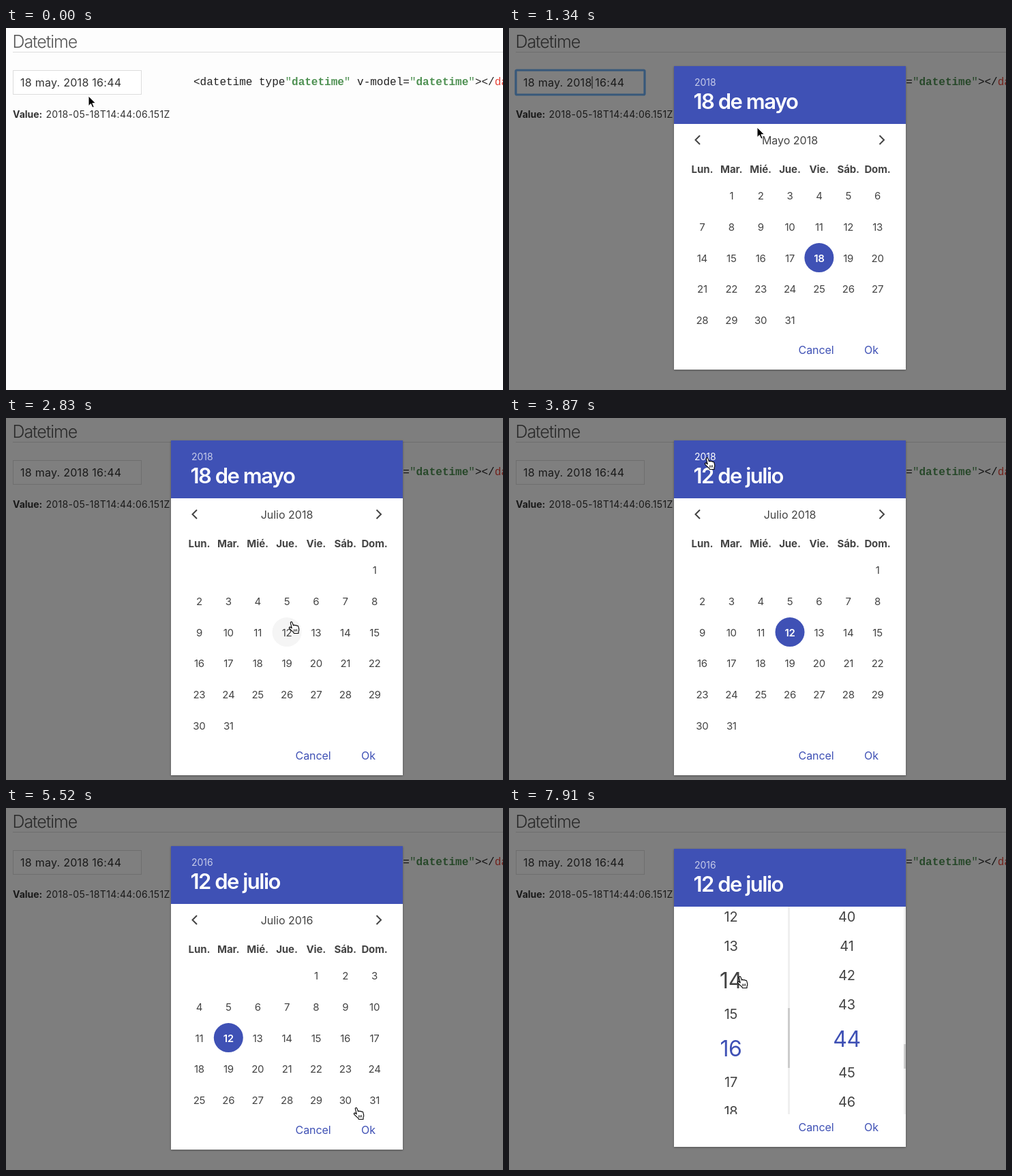
These frames come from a looping animation (729x532 px, 8000 ms). An HTML page:

```html
<!DOCTYPE html>
<html lang="es">
<head>
<meta charset="utf-8">
<title>Datetime</title>
<style>
  html, body { margin: 0; width: 100%; height: 100%; overflow: hidden; background: #fdfdfd; }
  #stage { display: block; font-family: Inter, Roboto, sans-serif; }
  .code { font: 16px "Liberation Mono", monospace; white-space: pre; }
  .popup { filter: drop-shadow(0 1px 1.5px rgba(0, 0, 0, .35)); }
</style>
</head>
<body>
<svg id="stage" width="729" height="532" viewBox="0 0 729 532"></svg>
<script>
const LOOP = 8000, STEP = 149.25;
const BLUE = '#3f51b5', INK = '#444';
const LEFT = 242, WIDTH = 340, MIDDLE = 279;
const MONTHS = { 4: 'Mayo', 5: 'Junio', 6: 'Julio' };
const WEEKDAYS = ['Lun.', 'Mar.', 'Mié.', 'Jue.', 'Vie.', 'Sáb.', 'Dom.'];
const stage = document.getElementById('stage');

// Moments of the story, counted in steps
const FOCUS = 6, TO_JUNE = 12, TO_JULY = 14, PICK_DAY = 21, OPEN_YEARS = 28, PICK_YEAR = 34, OPEN_TIME = 49;

// Pointer path: step, x, y
const PATH = [
  [0, 121, 100], [1, 121, 100], [2, 120, 100], [3, 120, 100], [4, 121, 96], [6, 121, 82], [7, 121, 82],
  [8, 215, 108], [9, 364, 146], [10, 480, 163], [11, 541, 161], [15, 540, 160], [16, 532, 172],
  [18, 440, 272], [19, 415, 299], [21, 415, 299], [22, 411, 285], [24, 350, 150], [26, 287, 58],
  [28, 285, 56], [29, 300, 85], [31, 404, 282], [33, 380, 228], [34, 376, 223], [35, 395, 255],
  [37, 510, 440], [38, 528, 466], [41, 528, 466], [43, 541, 481], [44, 537, 476], [45, 533, 477],
  [46, 533, 477], [47, 530, 476], [49, 527, 470], [51, 420, 330], [53, 335, 247], [54, 335, 247]
];

const rect = (x, y, w, h, fill, extra = '') =>
  `<rect x="${x}" y="${y}" width="${w}" height="${h}" fill="${fill}" ${extra}/>`;

function text(str, x, y, size, { fill = INK, weight = 400, anchor = 'start', gap = 0, extra = '' } = {}) {
  return `<text x="${x}" y="${y}" font-size="${size}" font-weight="${weight}" fill="${fill}"
    text-anchor="${anchor}" letter-spacing="${gap}" ${extra}>${str}</text>`;
}

const centered = (str, x, y, size, options) => text(str, x, y, size, { anchor: 'middle', ...options });

function page(step) {
  const focused = step >= FOCUS && step < TO_JUNE;
  const string = '"<tspan font-weight="700">datetime</tspan>"';
  const green = `<tspan fill="#4f9153">${string}</tspan>`;
  const ring = focused
    ? '<rect x="10" y="62" width="189" height="36" rx="1.5" fill="none" stroke="#6fb1f5" stroke-width="3.2"/>' +
      rect(121.5, 71, 1, 18, '#222')
    : '';
  return rect(0, 0, 729, 532, '#fdfdfd') +
    text('Datetime', 9.5, 29, 25, { weight: 300, fill: '#555', gap: -1.05 }) +
    rect(10, 35, 719, 1, '#ddd') +
    rect(10.5, 62.5, 188, 35, '#fff', 'stroke="#ddd"') +
    text('18 may. 2018 16:44', 21, 86, 16, { fill: '#333', gap: .27 }) + ring +
    text('Value:', 10, 132, 14, { fill: '#333', weight: 700 }) +
    text('2018-05-18T14:44:06.151Z', 58.5, 132, 14, { fill: '#333', gap: .32 }) +
    `<text class="code" x="275" y="84" fill="#222">&lt;datetime type${green} v-model=${green}&gt;&lt;/<tspan
      fill="#e8463a">datetime</tspan>&gt;</text>`;
}

function shownMonth(step) {
  if (step < TO_JUNE) return { year: 2018, month: 4 };
  if (step < TO_JULY) return { year: 2018, month: 5 };
  return { year: step < PICK_YEAR ? 2018 : 2016, month: 6 };
}

function calendar(step, top, { year, month, offset, days }) {
  const picked = step < PICK_DAY ? { day: 18, month: 4 } : { day: 12, month: 6 };
  const column = i => LEFT + 20 + (i + .5) * 300 / 7;
  const nextHover = step >= 11 && step < 16;
  const chevron = (x, dir, color) =>
    `<path d="M${x - 3.5 * dir} ${top + 102}l${6.5 * dir} 6.5l${-6.5 * dir} 6.5" fill="none" stroke="${color}" stroke-width="2"/>`;
  let out = chevron(276.5, -1, INK) + chevron(547, 1, nextHover ? '#888' : INK) +
    centered(`${MONTHS[month]} ${year}`, 412, top + 115, 16);
  WEEKDAYS.forEach((name, i) => out += centered(name, column(i), top + 157, 15, { weight: 700, gap: -.1 }));
  for (let day = 1; day <= days; day++) {
    const cell = offset + day - 1;
    const x = column(cell % 7), y = top + 190.2 + Math.floor(cell / 7) * 45.7;
    const selected = day === picked.day && month === picked.month;
    const hovered = day === 12 && step >= 18 && step < PICK_DAY;
    if (selected || hovered) out += `<circle cx="${x}" cy="${y}" r="21.5" fill="${selected ? BLUE : '#f5f5f5'}"/>`;
    out += centered(day, x, Math.round(y + 6), 15, { gap: -.3, fill: selected ? '#fff' : INK, weight: selected ? 600 : 400 });
  }
  return out;
}

// Scrolling column; grow maps a hovered value to its progress from small to large
function list(x, y, width, selected, thumbY, thumbHeight, grow) {
  let out = '', top = -6.5;
  for (let value = selected - 4; value <= selected + 4; value++) {
    const size = 20 + 12 * (value === selected ? 1 : grow[value] || 0);
    const height = 43 + (size - 20) * 14 / 12;
    out += centered(value, (width - 3) / 2, top + height / 2 + size * .36, size,
      { gap: -size * .01, fill: value === selected ? BLUE : INK });
    top += height;
  }
  return `<svg x="${x}" y="${y}" width="${width}" height="305">${out}` +
    rect(width - 3, 0, 3, 305, '#efefef') + rect(width - 3, thumbY, 3, thumbHeight, '#ccc') + '</svg>';
}

function popup(step) {
  const yearView = step >= OPEN_YEARS && step < PICK_YEAR;
  const timeView = step >= OPEN_TIME;
  const { year, month } = shownMonth(step);
  const offset = (new Date(year, month, 1).getDay() + 6) % 7;
  const days = new Date(year, month + 1, 0).getDate();
  const rows = Math.ceil((offset + days) / 7);
  const height = yearView || timeView ? 438 : 446 + (rows - 5) * 46;
  const top = MIDDLE - height / 2, bottom = top + height;
  const yearHover = step >= 26 && step <= OPEN_YEARS;
  const okHover = step >= 38 && step <= OPEN_TIME;

  let body;
  if (yearView) {
    const grow = { 2017: [0, 0, .35, .88, 1, .5][step - OPEN_YEARS], 2016: step === PICK_YEAR - 1 ? .5 : 0 };
    body = list(LEFT, top + 85, WIDTH, 2018, 142, 16, grow);
  } else if (timeView) {
    const grow = { 14: Math.min(1, Math.max(0, (step - 51) / 2)) };
    body = list(LEFT, top + 85, 170, 16, 149, 88, grow) + list(LEFT + 170, top + 85, 170, 44, 202, 36, {});
  } else {
    body = calendar(step, top, { year, month, offset, days });
  }
  return rect(LEFT, top, WIDTH, height, '#fff') + rect(LEFT, top, WIDTH, 85, BLUE) +
    text(year, 272, top + 29, 14, { fill: '#fff', extra: `opacity="${yearHover ? 1 : .7}"` }) +
    text(step < PICK_DAY ? '18 de mayo' : '12 de julio', 270.5, top + 63, 31, { fill: '#fff', weight: 600, gap: -1.5 }) +
    body +
    centered('Cancel', 450.5, bottom - 23, 16, { fill: BLUE, gap: -.1 }) +
    centered('Ok', 531.5, bottom - 23, 16, { fill: okHover ? INK : BLUE });
}

function pointer(step) {
  const i = PATH.findIndex(key => key[0] > step);
  const [s0, x0, y0] = PATH[i - 1], [s1, x1, y1] = PATH[i];
  const p = (step - s0) / (s1 - s0);
  const move = `transform="translate(${x0 + (x1 - x0) * p} ${y0 + (y1 - y0) * p})"`;
  if (step < 11) {
    return `<path ${move} d="M0 0v14.6l3.4-3.2 2.5 5.6 2.3-1-2.4-5.4h4.6z" fill="#000" stroke="#fff" stroke-width="1"/>`;
  }
  return `<g ${move} stroke="#000" stroke-width="1.1" stroke-linejoin="round">
    <path fill="#fff" d="M2.4 2.4C1.8.6 4.2-.2 4.9 1.6L6.5 6c.6-1.2 2-1 2.5 0 .9-.8 2-.5 2.4.5 1-.6 2-.1 2.3.9l.9 3.2
      c.4 1.8.1 3.2-.6 4.4v2.5H7.4l-.8-1.7C5 14.6 3.4 13 1.8 11.4.4 10-.2 8.8 1 8.2c1-.4 2.2.6 3.2 1.6z"/>
    <path fill="none" stroke-width=".9" d="M7.6 11.5v3.2M9.6 11.5v3.2M11.6 11.3v3.2"/></g>`;
}

function draw(step) {
  const fade = step < 7 ? 0 : step === 7 ? .35 : step === 8 ? .88 : 1;
  const shade = step === 7 ? .135 : fade / 2;
  stage.innerHTML = page(step) +
    (fade ? rect(0, 0, 729, 532, '#000', `opacity="${shade}"`) + `<g class="popup" opacity="${fade}">${popup(step)}</g>` : '') +
    pointer(step);
}

let lastStep = -1;
const start = performance.now();
function tick() {
  const time = (performance.now() - start) % LOOP;
  const step = Math.min(53, Math.floor((time + 10) / STEP));
  if (step !== lastStep) draw(lastStep = step);
  requestAnimationFrame(tick);
}
tick();
</script>
</body>
</html>
```
